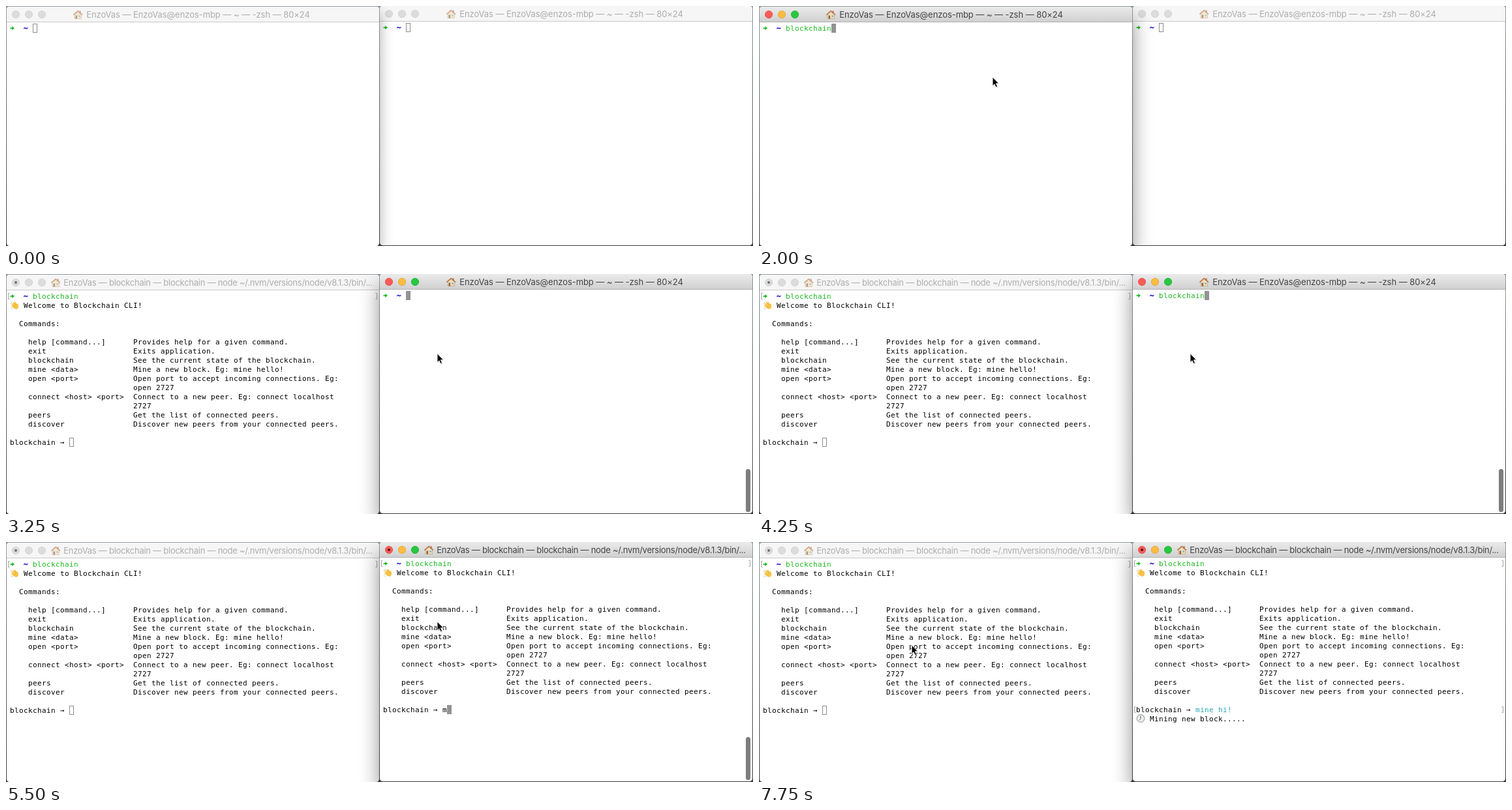
An HTML page for the animation above (8 s loop, 1145 px wide and 368 px high).

```html
<!DOCTYPE html>
<html lang="en">
<head>
<meta charset="utf-8">
<title>Blockchain CLI</title>
<style>
html, body { margin: 0; width: 100%; height: 100%; overflow: hidden; background: #333; }
svg { display: block; }
text { white-space: pre; }
.mono { font: 11px "DejaVu Sans Mono", monospace; }
.bold { font-weight: bold; stroke: currentColor; stroke-width: .4px; }
.title { font: 13px Inter, sans-serif; text-anchor: middle; font-feature-settings: "calt" 0; letter-spacing: -.06px; }
.tight { letter-spacing: -.26px; }
</style>
</head>
<body>
<svg id="stage" width="1145" height="368" viewBox="0 0 1145 368">
  <defs>
    <linearGradient id="desk" x2="0" y2="1">
      <stop offset="0" stop-color="#929aa1"/>
      <stop offset=".3" stop-color="#6d7276"/>
      <stop offset="1" stop-color="#3a3a3b"/>
    </linearGradient>
    <linearGradient id="bar" x2="0" y2="1">
      <stop offset="0" stop-color="#ebebeb"/>
      <stop offset="1" stop-color="#d0d0d0"/>
    </linearGradient>
    <filter id="soft" x="-20%" y="-20%" width="140%" height="140%"><feGaussianBlur stdDeviation="16"/></filter>
    <filter id="softer" x="-20%" y="-20%" width="140%" height="140%"><feGaussianBlur stdDeviation="11"/></filter>
    <g id="house">
      <path d="M105 13V19.5H115.5V13L110.2 8.5Z" fill="#f3dfb8" stroke="#b99b74" stroke-width=".7"/>
      <path d="M112.6 7.5h2v4h-2z" fill="#a5673f"/>
      <path d="M103.4 13.6L110.2 7.6L117 13.6" fill="none" stroke="#b9744a" stroke-width="1.7"/>
      <path d="M106.5 14.5h2.6v5h-2.6z" fill="#8d5a3b"/>
      <path d="M111.3 14.3h2.7v2.6h-2.7z" fill="#7fb0cf"/>
    </g>
    <g id="wave" fill="none" stroke-linecap="round">
      <path d="M9.5 46L14 51M11.4 44.2L15.5 49M13.6 43.6L16.8 48M9 49L13 52M17.6 46.2L18.2 50" stroke="#f7c344" stroke-width="1.9"/>
      <path d="M12 48.5L16 46.5L19 49.5Q19 53.5 15.5 54Q13 53.5 11 51Z" fill="#f7c344"/>
      <path d="M11.3 46.2L14 49M13.3 45.2L15.7 48" stroke="#d99a2b" stroke-width=".5"/>
      <path d="M7.3 45.5Q7.6 43.4 9.4 42.6M10 54Q8.2 53.6 7.4 52" stroke="#9fb4c4" stroke-width=".7"/>
    </g>
    <g id="clock">
      <circle cx="13" cy="271.5" r="5.8" fill="#efefef" stroke="#a3a7aa" stroke-width="1.3"/>
      <path d="M13 267.6V271.5L11.3 274.4" fill="none" stroke="#555" stroke-width=".9"/>
    </g>
    <path id="mouse" d="M0 0V13.6L3 10.8L5.1 15.6L7.5 14.6L5.4 9.8H9.5Z" stroke="#fff" stroke-width=".9" stroke-linejoin="round"/>
  </defs>
  <g id="scene"></g>
</svg>
<script>
const STEP = 250, LOOP = 8000, CELL = 7, LINE = 14, WIDTH = 571, HEIGHT = 367;
const SHELL_TITLE = 'EnzoVas — EnzoVas@enzos-mbp — ~ — -zsh — 80×24';
const NODE_TITLE = 'EnzoVas — blockchain — blockchain — node ~/.nvm/versions/node/v8.1.3/bin/...';
const GREEN = '#19b51e', CYAN = '#2ba8b6', BLUE = '#1a0fcf';
const HELP = [
  ['help [command...]', 'Provides help for a given command.'],
  ['exit', 'Exits application.'],
  ['blockchain', 'See the current state of the blockchain.'],
  ['mine <data>', 'Mine a new block. Eg: mine hello!'],
  ['open <port>', 'Open port to accept incoming connections. Eg:'],
  ['', 'open 2727'],
  ['connect <host> <port>', 'Connect to a new peer. Eg: connect localhost'],
  ['', '2727'],
  ['peers', 'Get the list of connected peers.'],
  ['discover', 'Discover new peers from your connected peers.']
];

const escape = s => s.replace(/&/g, '&amp;').replace(/</g, '&lt;').replace(/>/g, '&gt;');
const colX = col => 6 + CELL * col;

// Every character sits in its own terminal cell.
function mono(str, col, row, fill = '#000', cls = '') {
  if (!str) return '';
  const xs = [...str].map((c, i) => colX(col + i)).join(' ');
  return `<text class="mono ${cls}" x="${xs}" y="${38 + LINE * row}" fill="${fill}" color="${fill}">${escape(str)}</text>`;
}

function caret(col, row, active) {
  const x = colX(col), y = 27 + LINE * row;
  return active
    ? `<rect x="${x}" y="${y}" width="7" height="14" fill="#939393"/>`
    : `<rect x="${x + .5}" y="${y + .5}" width="6" height="13" fill="none" stroke="#8c8c8c"/>`;
}

const brackets = row =>
  `<path transform="translate(0 ${LINE * row})" d="M5.5 29.5H3.5V38.5H5.5M566.5 29.5H568.5V38.5H566.5" fill="none" stroke="#a6a6a6"/>`;

function lights(active, running) {
  const fills = active ? ['#fc5b57', '#fdbc40', '#27c840'] : Array(3).fill('#dcdcdc');
  const rims = active ? ['#e2463f', '#e0a02e', '#1eac2b'] : Array(3).fill('#cfcfcf');
  const dots = fills.map((f, i) =>
    `<circle cx="${15 + 20 * i}" cy="13" r="5.6" fill="${f}" stroke="${rims[i]}" stroke-width=".8"/>`).join('');
  return dots + (running ? `<circle cx="15" cy="13" r="2" fill="${active ? '#4d0a06' : '#707070'}"/>` : '');
}

function helpText() {
  return '<use href="#wave"/>' + mono('Welcome to Blockchain CLI!', 3, 1) + mono('Commands:', 2, 3) +
    HELP.map(([name, info], i) => mono(name, 4, 5 + i) + mono(info, 27, 5 + i)).join('');
}

function content(w) {
  let out = '<path d="M6.5 33.2H9.2V31L13 34.1L9.2 37.2V35H6.5Z" fill="#20bd28"/>' +
    mono('~', 3, 0, BLUE, 'bold') + mono(w.typed, 5, 0, GREEN);
  if (!w.running) return out + caret(5 + w.typed.length, 0, w.active);
  out += brackets(0);
  if (!w.help) return out + caret(0, 1, w.active);
  out += helpText() + mono('blockchain →', 0, 16);
  if (!w.dots) return out + mono(w.entry, 13, 16) + caret(13 + w.entry.length, 16, w.active);
  return out + brackets(16) + mono(w.entry, 13, 16, CYAN) +
    '<use href="#clock"/>' + mono('Mining new block' + '.'.repeat(w.dots), 3, 17);
}

function titleBar(w) {
  const [text, cls, x, shift] = w.running ? [NODE_TITLE, 'title tight', 325, -34] : [SHELL_TITLE, 'title', 294.5, 0];
  return `<path d="M1 24V5.5Q1 1 5.5 1H${WIDTH - 3.5}Q${WIDTH + 1} 1 ${WIDTH + 1} 5.5V24Z" fill="${w.active ? 'url(#bar)' : '#f6f6f6'}"/>
    <rect x="1" y="24" width="${WIDTH}" height="1" fill="${w.active ? '#b1b1b1' : '#c9c9c9'}"/>
    ${lights(w.active, w.running)}
    <use href="#house" x="${shift}" opacity="${w.active ? .95 : .6}"/>
    <text class="${cls}" x="${x}" y="18" fill="${w.active ? '#444' : '#adadad'}">${text}</text>`;
}

function terminal(w) {
  return `<g transform="translate(${w.x} ${w.y})">
    <rect x="1" y="1" width="${WIDTH}" height="${HEIGHT}" rx="4.5" fill="#fff"/>
    ${titleBar(w)}
    ${content(w)}
    ${w.bar ? '<rect x="562" y="300" width="7" height="66" rx="3.5" fill="#7d7d7d"/>' : ''}
  </g>`;
}

// The front window's shadow, kept within the window behind it.
function shadow(front, back) {
  const [drop, blur, alpha] = front.active ? [16, 'soft', .45] : [10, 'softer', .34];
  const x = back.x + 1, y = back.y + 1;
  return `<svg x="${x}" y="${y}" width="${WIDTH}" height="${HEIGHT}" viewBox="${x} ${y} ${WIDTH} ${HEIGHT}">
    <rect x="${front.x + 1}" y="${front.y + 1 + drop}" width="${WIDTH}" height="${HEIGHT}" opacity="${alpha}" filter="url(#${blur})"/>
  </svg>`;
}

// Last [time, value] entry that has been reached.
const latest = (t, keys) => keys.reduce((v, [at, next]) => t >= at ? next : v, keys[0][1]);

function pointer(t) {
  if (t < 500) return '';
  const [x, y] = latest(t, [
    [500, [338, 170]], [750, [352, 124]], [1000, [358, 109]],
    [2500, [492, 117]], [2750, [661, 122]],
    [7000, [604, 132]], [7250, [420, 147]], [7500, [274, 156]], [7750, [234, 158]]
  ]);
  return `<use href="#mouse" x="${x + 1}" y="${y + 2}" opacity=".15"/><use href="#mouse" x="${x}" y="${y}"/>`;
}

function draw(t) {
  const word = 'blockchain', phrase = 'mine hi!';
  const left = {
    x: 0, y: 0, active: t >= 750 && t < 3250, running: t >= 2250, help: t >= 3000, entry: '', dots: 0,
    typed: word.slice(0, latest(t, [[0, 0], [1000, 1], [1250, 3], [1500, 5], [1750, 8], [2000, 10]]))
  };
  const right = {
    x: 572, y: -1, active: t >= 3250, running: t >= 4500, help: t >= 5000, bar: t >= 3000 && t < 6750,
    typed: word.slice(0, latest(t, [[0, 0], [3500, 2], [3750, 5], [4000, 8], [4250, 10]])),
    entry: phrase.slice(0, latest(t, [[0, 0], [5500, 1], [5750, 3], [6000, 5], [6250, 7], [6750, 8]])),
    dots: latest(t, [[0, 0], [7000, 1], [7250, 2], [7500, 4], [7750, 5]])
  };
  const [back, front] = t < 3250 ? [right, left] : [left, right];
  document.getElementById('scene').innerHTML =
    '<rect width="1145" height="368" fill="url(#desk)"/>' +
    terminal(back) + shadow(front, back) + terminal(front) + pointer(t);
}

let shown = -1;
function tick() {
  const step = Math.floor(performance.now() % LOOP / STEP);
  if (step !== shown) draw((shown = step) * STEP);
  requestAnimationFrame(tick);
}
tick();
</script>
</body>
</html>
```
